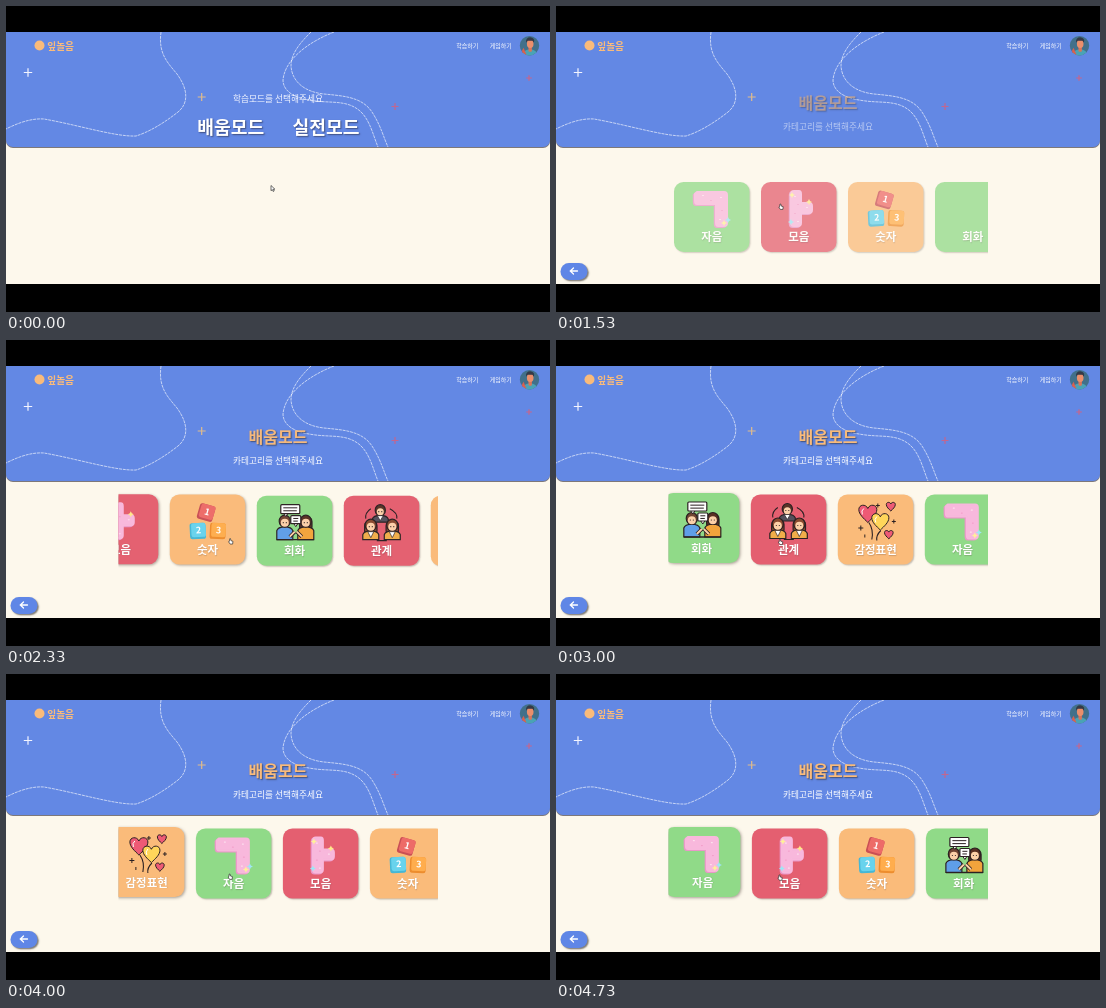
These frames come from a looping animation (544x306 px, 4.79 s). An HTML page with a canvas:

```html
<!DOCTYPE html>
<html lang="ko">
<head>
<meta charset="utf-8">
<style>
html, body { margin: 0; width: 100%; height: 100%; overflow: hidden; background: #000; }
canvas { display: block; }
</style>
</head>
<body>
<canvas id="stage" width="544" height="306"></canvas>
<script>
const W = 544, H = 306, LOOP = 4790, SWITCH = 640;
const TOP = 26, BOTTOM = 278, PITCH = 87, CARD_W = 75.5, CARD_H = 70;
const FONT = '"Noto Sans CJK KR", "Noto Sans CJK", "Noto Sans CJK JP", sans-serif';
const GREEN = '#90da88', RED = '#e45f70', ORANGE = '#fabb7a', BLUE = '#6388e4';
const INK = '#2b2022', SKIN = '#fcd0a8';

const stage = document.getElementById('stage').getContext('2d');
const layer = document.createElement('canvas');
layer.width = W;
layer.height = H;
const cardCtx = layer.getContext('2d');
let c = stage;

const clamp = (v, a = 0, b = 1) => Math.min(b, Math.max(a, v));

// Standard CSS "ease" curve
function ease(x) {
  x = clamp(x);
  let lo = 0, hi = 1;
  const bez = (s, a, b) => 3 * (1 - s) ** 2 * s * a + 3 * (1 - s) * s * s * b + s ** 3;
  for (let i = 0; i < 24; i++) {
    const mid = (lo + hi) / 2;
    if (bez(mid, .25, .25) < x) lo = mid; else hi = mid;
  }
  return bez(lo, .1, 1);
}

// Linear interpolation over [time, value] pairs
function track(t, keys) {
  if (t <= keys[0][0]) return keys[0][1];
  for (let i = 1; i < keys.length; i++) {
    const [t0, a] = keys[i - 1], [t1, b] = keys[i];
    if (t <= t1) return a + (b - a) * (t - t0) / (t1 - t0);
  }
  return keys[keys.length - 1][1];
}

function paint(fill, stroke, width = 1) {
  if (fill) { c.fillStyle = fill; c.fill(); }
  if (stroke) { c.strokeStyle = stroke; c.lineWidth = width; c.stroke(); }
}
function box(x, y, w, h, r, fill, stroke, width) {
  c.beginPath();
  c.roundRect(x, y, w, h, r);
  paint(fill, stroke, width);
}
function disc(x, y, rx, ry, fill, stroke, width) {
  c.beginPath();
  c.ellipse(x, y, rx, ry, 0, 0, Math.PI * 2);
  paint(fill, stroke, width);
}
function path(d, fill, stroke, width) {
  const p = new Path2D(d);
  if (fill) { c.fillStyle = fill; c.fill(p); }
  if (stroke) { c.strokeStyle = stroke; c.lineWidth = width; c.stroke(p); }
}
function text(str, x, y, size, color, weight = 400, align = 'center') {
  c.font = `${weight} ${size}px ${FONT}`;
  c.textAlign = align;
  c.textBaseline = 'alphabetic';
  c.fillStyle = color;
  c.fillText(str, x, y + size * .36);
}
function shadow(color, dx = 0, dy = 0, blur = 0) {
  c.shadowColor = color;
  c.shadowOffsetX = dx;
  c.shadowOffsetY = dy;
  c.shadowBlur = blur;
}
const noShadow = () => shadow('transparent');

function heart(x, y, s, fill) {
  c.save();
  c.translate(x, y);
  c.scale(s, s);
  path('M0 9C-4 5-9 1-9-4C-9-9-2-10 0-5C2-10 9-9 9-4C9 1 4 5 0 9Z', fill, INK, 1 / s);
  c.restore();
}

function candy(d, sprinkles) {
  c.lineJoin = 'round';
  c.save();
  c.translate(-1.2, 1);
  path(d, '#ea97c8', '#ea97c8', 2);
  c.restore();
  path(d, '#f8b8dc', '#f8b8dc', 2);
  const tints = ['#fde2ee', '#f39fca'];
  sprinkles.forEach(([x, y], i) => box(x, y, 2, 1.2, .6, tints[i % 2]));
}
function star(x, y, color) {
  path(`M${x} ${y - 3}L${x + 1} ${y - 1}L${x + 3} ${y}L${x + 1} ${y + 1}L${x} ${y + 3}L${x - 1} ${y + 1}L${x - 3} ${y}L${x - 1} ${y - 1}Z`, color);
}
function block(digit, x, y, angle, color, side) {
  c.save();
  c.translate(x, y);
  c.rotate(angle);
  box(-8, -7.5, 16, 16, 2.5, side);
  box(-6.5, -7.5, 14.5, 14, 2.5, color);
  text(digit, .8, -.5, 9, '#fff', 700);
  c.restore();
}
function person(x, y, hair, shirt, { r = 5, body = 10, long = false } = {}) {
  if (long) box(x - r - 1.2, y - r, 2 * r + 2.4, 2 * r + 5, r, hair, INK, 1.2);
  path(`M${x - 8} ${y + r + body}V${y + r + 4}Q${x - 7} ${y + r + .5} ${x} ${y + r}Q${x + 7} ${y + r + .5} ${x + 8} ${y + r + 4}V${y + r + body}Z`, shirt, INK, 1.2);
  disc(x, y - .5, r + .6, r + 1, hair, INK, 1.2);
  disc(x, y + 1.2, r - 1, r - 1, SKIN);
  disc(x - 1.5, y + 1, .6, .6, INK);
  disc(x + 1.5, y + 1, .6, .6, INK);
}
function bubble(x, y, w, h) {
  path(`M${x + 3} ${y + h}L${x + 5} ${y + h + 3}L${x + 7} ${y + h}`, '#fff', INK, 1);
  box(x, y, w, h, 1, '#fff', INK, 1.2);
  path(`M${x + 2.500} ${y + h * .35}H${x + w - 2.500}M${x + 2.500} ${y + h * .68}H${x + w - 3}`, null, INK, 1);
}

const cards = [
  { label: '자음', color: GREEN, ready: 0, icon() {
    candy('M23 10H50Q53 10 53 13V41Q53 44 50 44H44Q42 44 42 41V22H23Q21 22 21 19V12Z',
      [[28, 13], [36, 18], [46, 15], [47, 28], [45, 37]]);
    star(50, 41, '#fff09a');
    star(54, 38, '#9fe6f5');
  } },
  { label: '모음', color: RED, ready: 1150, icon() {
    candy('M33 9H38Q40 9 40 12V21H48Q51 21 51 24V28Q51 31 48 31H40V41Q40 44 37 44H33Q30 44 30 41V12Q30 9 33 9Z',
      [[33, 14], [36, 22], [45, 25], [33, 31], [36, 39]]);
    star(31, 13, '#fff09a');
    star(48, 20, '#ffe88a');
    star(30, 40, '#9fe6f5');
  } },
  { label: '숫자', color: ORANGE, ready: 1150, icon() {
    block('1', 36.5, 17.5, .28, '#ed6b68', '#c94f55');
    block('2', 28, 36, -.05, '#68d3ed', '#46b7d5');
    block('3', 48, 36, .05, '#ffad4d', '#ed8d2e');
  } },
  { label: '회화', color: GREEN, ready: 1650, icon() {
    person(28, 26, '#714432', '#5f9ee8', { body: 13 });
    person(49, 26, '#5a3023', '#f2a43c', { body: 13, long: true });
    bubble(24, 9, 19, 9);
    bubble(34, 20, 10, 8);
    path('M33 41L38 36M45 41L40 36', null, INK, 3.6);
    path('M33 41L38 36M45 41L40 36', null, SKIN, 1.8);
    path('M20 44H57', null, INK, 1.3);
  } },
  { label: '관계', color: RED, ready: 1650, icon() {
    path('M27 13Q21 17 22 23M46 13Q54 17 53 23M33 45H43', null, INK, 1.1);
    person(36.5, 15, '#5a3327', '#54505c', { r: 4.5, body: 7 });
    path('M33.500 20L36.500 25L39.500 20Z', '#fff', INK, .7);
    person(27, 30, '#8a4a30', '#f0ad4a', { body: 9, long: true });
    person(48.5, 30, '#8a4a30', '#f0ad4a', { body: 9, long: true });
    path('M24 36L27 42L30 36ZM45.500 36L48.500 42L51.500 36Z', '#fff', INK, .7);
  } },
  { label: '감정표현', color: ORANGE, ready: 1650, icon() {
    path('M31 28Q36 35 34 45M43 36Q38 41 39 46', null, INK, 1.1);
    heart(30, 19, 1, '#ee5a75');
    heart(42.5, 27, .95, '#ffd65a');
    heart(53, 12, .5, '#ee5a75');
    heart(51, 40, .48, '#ee5a75');
    path('M40 9V13M38 11H42M23 31V36M20.500 33.500H25.500M27 40V43M56 25V29M54 27H58', null, INK, 1);
    path('M26 14Q23 16 24.500 20M39 22Q36 25 38 28', null, '#fff', 1);
  } }
];

function drawCard(card, x, y, lift, t) {
  shadow(`rgba(90,75,65,${.35 + lift * .1})`, 1, 1, 1.5 + lift);
  box(x, y - lift, CARD_W, CARD_H, 9.5, card.color);
  noShadow();
  c.save();
  c.translate(x, y - lift);
  if (t >= card.ready) card.icon();
  shadow('rgba(80,60,60,.25)', .5, .7, 1);
  text(card.label, CARD_W / 2, 55.4, 11.5, '#fff', 700);
  c.restore();
}

function drawSlider(t, fade, y, shrink) {
  const offset = track(t, [[1630, 0], [2330, 128], [3000, 271], [4000, 450], [4730, 531], [LOOP, 538]]);
  c = cardCtx;
  c.clearRect(0, 0, W, H);
  c.save();
  c.beginPath();
  c.rect(112.5, TOP, 319.5 - shrink, BOTTOM - TOP);
  c.clip();
  const first = Math.max(0, Math.floor(offset / PITCH) - 1);
  for (let i = first; i < first + 6; i++) {
    const far = Math.abs(i - offset / PITCH);
    const lift = t < 1630 ? 0 : 1.5 * clamp((.65 - far) * 6);
    drawCard(cards[i % cards.length], 118 + i * PITCH - offset, y, lift, t);
  }
  c.restore();
  c = stage;
  c.globalAlpha = fade;
  c.drawImage(layer, 0, 0);
  c.globalAlpha = 1;
}

function plus(x, y, r, color) {
  path(`M${x - r} ${y}H${x + r}M${x} ${y - r}V${y + r}`, null, color, 1.2);
}

function drawAvatar(x, y) {
  c.save();
  disc(x, y, 9.7, 9.7, '#41708a');
  c.clip();
  disc(x + .5, y + 10, 7.5, 6.5, '#4aa3b5');
  path(`M${x - 9} ${y + 8}L${x - 6} ${y + 2}L${x - 3} ${y + 9}Z`, '#d9604f');
  box(x - 1, y, 3.4, 6, 1, '#d9755a');
  disc(x + .7, y - 2, 3.3, 4.3, '#ea8f6c');
  path(`M${x - 3.500} ${y - 3}Q${x - 4} ${y - 8.500} ${x + 1} ${y - 8.500}Q${x + 6} ${y - 7.500} ${x + 4.300} ${y - 3}L${x + 3} ${y - 5}H${x - 2}Z`, '#343a48');
  c.restore();
}

function drawHeader(shrink) {
  shadow('rgb(125,120,122)', 0, 1, .6);
  box(0, TOP - 10, W, 125, [0, 0, 7, 7], BLUE);
  noShadow();

  c.save();
  c.beginPath();
  c.rect(0, TOP, W, 115);
  c.clip();
  c.scale(1 - shrink / W, 1);
  c.setLineDash([3, .8]);
  const line = 'rgba(255,255,255,.85)';
  path('M155 26C152 48 162 57 171 68C182 83 183 97 172 106C158 117 143 126 130 130C110 131 72 119 38 113C24 112 10 118 0 123', null, line, .75);
  path('M328 26C305 35 279 52 277 74C277 86 290 92 303 94C324 98 340 93 354 105C364 114 367 129 372 141', null, line, .75);
  path('M305 26C295 36 285 47 285 60C286 76 299 86 318 88C338 90 356 91 366 106C375 120 377 130 382 141', null, line, .75);
  c.restore();

  plus(22, 66.5, 4.2, '#f2f4ff');
  plus(195.7 - shrink * .4, 91, 4, '#dfbb8c');
  plus(389 - shrink * .6, 100.5, 3.5, '#c2668f');
  plus(523 - shrink, 72, 2.8, '#c9658a');

  disc(33.5, 39.5, 5, 5, ORANGE);
  text('잎놀음', 41.3, 40.2, 9.7, ORANGE, 700, 'left');
  text('학습하기', 461.3 - shrink, 40, 6, '#fff', 500);
  text('게임하기', 494.8 - shrink, 40, 6, '#fff', 500);
  drawAvatar(523.5 - shrink, 39.7);
}

function drawLanding() {
  text('학습모드를 선택해주세요', 272, 93, 8.7, '#f4f6ff');
  shadow('rgba(40,40,60,.6)', 1, 1.3, 1.5);
  text('배움모드', 224.7, 121, 18.2, '#fff', 700);
  text('실전모드', 320, 121, 18.2, '#fff', 700);
  noShadow();
}

function drawBackButton() {
  shadow('rgba(60,55,50,.65)', 1.3, 1.3, 1.5);
  box(4.5, 257, 27, 17, 8.5, '#5f86e6');
  noShadow();
  c.lineCap = 'round';
  path('M14.500 265H21.500M17.500 262L14.300 265L17.500 268', null, '#fff', 1.3);
  c.lineCap = 'butt';
}

function drawCursor(t) {
  const x = track(t, [[0, 265], [100, 265], [530, 236], [1070, 236], [1480, 224], [LOOP, 223]]);
  const y = track(t, [[0, 179.5], [100, 179.5], [530, 120], [1070, 120], [1480, 198], [4000, 200], [LOOP, 201]]);
  const arrow = 'l0 5.200l1.300-1.100l.9 1.900l1-.5l-.9-1.800h1.600Z';
  const hand = 'l.8 0l.4 2l2 .6l-.3 2.800h-2.500l-1.600-2.400l.8-.3Z';
  path(`M${x} ${y}${t > 430 ? hand : arrow}`, '#fff', '#333', .7);
}

function draw(t) {
  c.fillStyle = '#fdf8ec';
  c.fillRect(0, 0, W, H);

  const learning = t >= SWITCH;
  const fade = learning ? ease((t - SWITCH) / 2000) : 0;
  const cardY = 154.5 + 83 * (1 - fade);
  // The page scrollbar narrows the layout while the cards overflow
  const shrink = learning && cardY + CARD_H > 274 ? 2.5 : 0;

  drawHeader(shrink);
  if (learning) {
    const mid = 272 - shrink / 2;
    c.globalAlpha = fade * fade;
    shadow('rgba(50,50,60,.7)', 1, 1.2, 1.5);
    text('배움모드', mid, 97, 16, ORANGE, 700);
    noShadow();
    text('카테고리를 선택해주세요', mid, 121, 8.7, '#fff');
    c.globalAlpha = 1;
    drawSlider(t, fade, cardY, shrink);
    drawBackButton();
  } else {
    drawLanding();
  }
  drawCursor(t);

  c.fillStyle = '#000';
  c.fillRect(0, 0, W, TOP);
  c.fillRect(0, BOTTOM, W, H - BOTTOM);
}

function tick() {
  draw(performance.now() % LOOP);
  requestAnimationFrame(tick);
}
tick();
</script>
</body>
</html>
```
